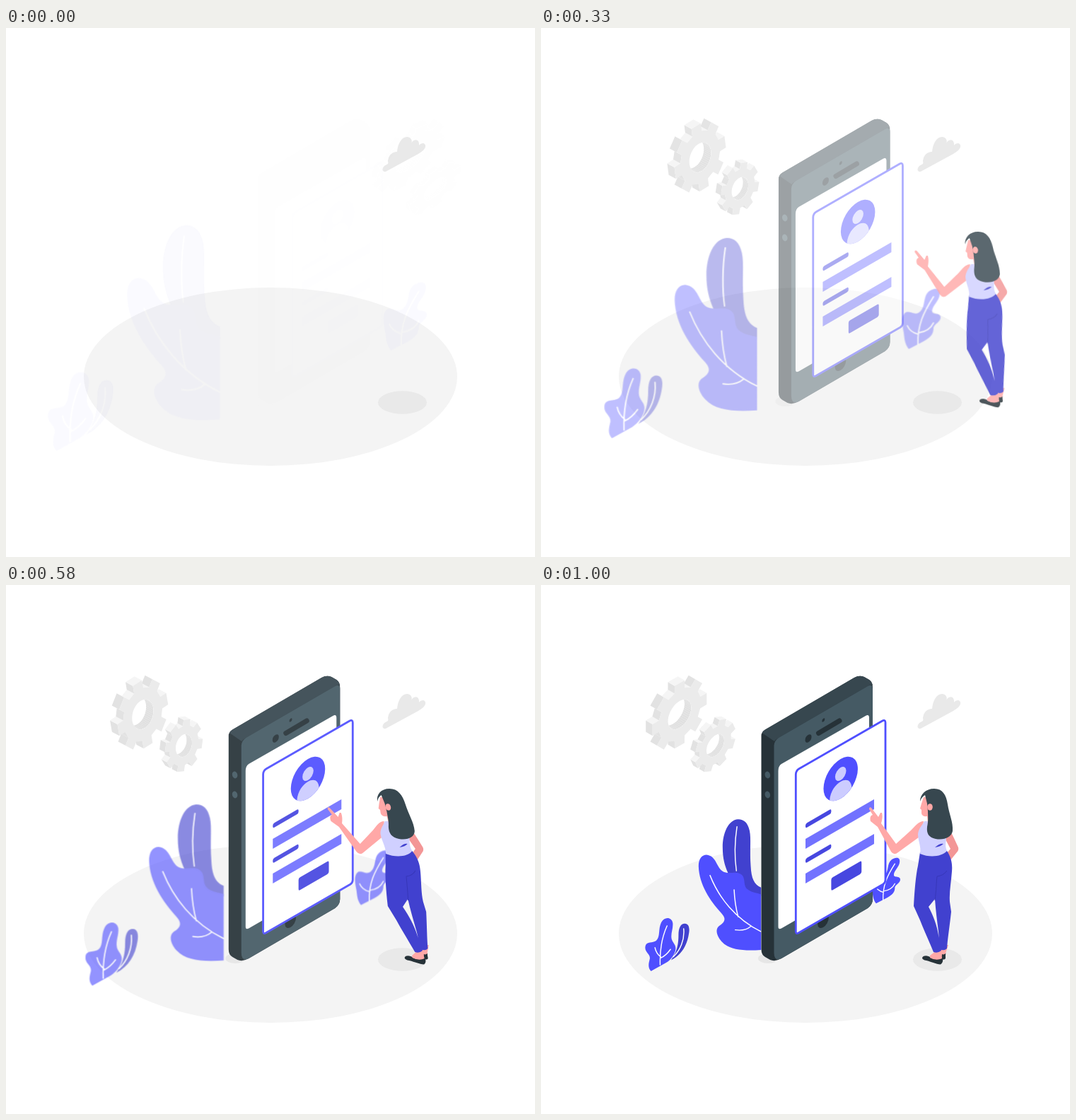
An HTML page for the animation above (1040 ms loop, 748x748 px).

```html
<!DOCTYPE html>
<html lang="en">
<head>
<meta charset="utf-8">
<title>Phone profile form</title>
<style>
html, body { margin: 0; width: 100%; height: 100%; overflow: hidden; background: #fff; }
svg { display: block; width: 100vw; height: 100vh; }
.vein { fill: none; stroke: #fff; stroke-width: 1.8; stroke-linecap: round; }
</style>
</head>
<body>
<svg viewBox="0 0 748 748">
  <ellipse cx="374" cy="493" rx="264" ry="126" fill="#f4f4f4"/>
  <ellipse cx="560.5" cy="529.5" rx="34.5" ry="16.3" fill="#e9e9e9"/>
  <path fill="#e9e9e9" d="M537 203C532 204 531 199 535 195C540 192 541 193 540 188C541 180 546 175 553 175C554 164 559 154 567 154C573 154 575 160 573 163C578 155 585 158 584 166C588 161 594 163 593 168C592 172 588 175 583 178Z"/>

  <g id="plants" fill="#4f4fff">
    <path fill="#4141cf" d="M307 425C295 420 290 409 289 388C287 360 290 340 287 326C284 312 277 306 267 306C250 307 240 330 240 355C240 375 244 387 249 399L270 440H307Z"/>
    <path class="vein" d="M265 319C261 345 261 375 264 396"/>
    <path d="M307 437C297 434 290 434 283 428C275 421 281 408 272 402C264 396 252 402 242 398C229 392 230 370 212 368C203 368 198 376 198 388C199 420 218 448 238 470C248 481 242 487 234 492C226 498 230 511 239 520C252 534 276 536 307 534Z"/>
    <path class="vein" d="M218 404C233 442 262 480 307 502M260 429C261 450 264 465 267 476M262 499C275 501 283 498 289 493"/>
    <path fill="#4141cf" d="M150 552C160 538 163 525 163 508C163 495 167 488 174 488C181 488 183 496 181 506C178 526 168 543 150 552Z"/>
    <path class="vein" d="M172 497C174 516 166 535 154 546"/>
    <path d="M115 571C109 564 111 558 113 549C114 541 104 538 105 529C106 518 117 523 124 518C132 511 127 498 133 486C138 476 151 476 153 487C154 497 149 505 151 515C153 522 159 525 158 533C157 541 150 551 142 556Z"/>
    <path class="vein" d="M143 492C134 512 130 532 131 560M122 530Q124 540 132 546M149 533Q141 544 132 548"/>
    <g transform="matrix(.9355 0 0 .9355 21.2 28.3)">
      <path d="M520 454C514 446 514 439 513 431C511 421 508 407 516 402C523 400 528 407 535 402C545 394 539 380 549 372C556 367 565 367 564 376C563 387 553 392 553 401C554 406 563 402 565 408C566 416 556 418 555 424C555 432 552 437 541 443Z"/>
      <path class="vein" d="M555 380C541 402 532 420 533 448M518 421Q522 430 533 433M555 417Q549 429 534 431"/>
    </g>
  </g>

  <g id="gears"></g>

  <g id="phone">
    <ellipse cx="321" cy="528" rx="14" ry="7" fill="#e6e6e6"/>
    <path fill="#263238" d="M311.5 213Q311.5 208 317 204.5L443 131Q450 127 457 130L464 134Q469 137 469 145V444Q469 452 462 457L340 528Q331 533 324 530L317 526Q311.5 523 311.5 515Z"/>
    <path fill="#37474f" d="M312.5 209Q314 206 317 204.5L443 131Q450 127 457 130L464 134Q468 137 469 142Q467 139.5 462 143L336 216Q331 219 330 221Z"/>
    <path fill="#455a64" d="M329.5 520V227Q330 220 336 216L462 143Q469 139 469 147V444Q469 452 462 457L340 528Q329.5 533 329.5 520Z"/>
    <g fill="#455a64">
      <ellipse cx="320.3" cy="268.5" rx="3.7" ry="5" transform="rotate(-15 320.3 268.5)"/>
      <ellipse cx="320.3" cy="296.5" rx="3.7" ry="5" transform="rotate(-15 320.3 296.5)"/>
    </g>
    <g fill="#263238">
      <path stroke="#263238" stroke-width="7" stroke-linecap="round" d="M392.5 209.5L422 192"/>
      <circle r="5.2" transform="matrix(.866 -.5 0 1 378 217)"/>
      <circle r="2.3" transform="matrix(.866 -.5 0 1 399.3 191)"/>
      <circle r="9" transform="matrix(.866 -.5 0 1 399 475)"/>
    </g>
    <path fill="#fff" d="M335.5 263Q335.5 256 340 253L459 185Q464 182 464 188V414L340 485.5Q335.5 488 335.5 483Z"/>
    <path fill="#fff" stroke="#4f4fff" stroke-width="2.8" d="M360.3 268Q360.3 262.5 365 259.8L482 192.5Q487 189.7 487 194.5V417Q487 421 483.5 423.2L364 492Q360.3 494 360.3 490Z"/>
    <g transform="matrix(.866 -.5 0 1 423.7 274)">
      <circle r="28" fill="#4f4fff"/>
      <circle cy="-7" r="9" fill="#ccccff"/>
      <path fill="#ccccff" d="M-18 21.4C-17 9-8 4 0 4S17 9 18 21.4A28 28 0 0 1-18 21.4Z"/>
    </g>
    <g transform="matrix(.866 -.5 0 1 374 359)">
      <path fill="#7272ff" d="M0 0H112V14H0ZM0 49H112V63H0Z"/>
      <g fill="#4747e0">
        <rect y="-21.5" width="42" height="6.5" rx="2.6"/>
        <rect y="28" width="42" height="6.5" rx="2.6"/>
        <rect x="42" y="76.5" width="49.5" height="18" rx="2.5"/>
      </g>
    </g>
  </g>

  <g id="woman" fill="#ffa8a7">
    <path fill="#f39696" d="M572 346C579 346 581 352 584 358L590 371Q591 375 588 378L579 389L573 380L579 373L571 358Z"/>
    <path d="M559 509H576L573 518L571 526L567 530L559 527Z"/>
    <path fill="#263238" d="M567 522C571 524 573 518 572 523V528Q570 531 566 528ZM539 527C541 523 548 524 551 527C558 531 563 528 568 528Q569 534 565 536.5C558 536 553 533 545 531Q539 530 539 527Z"/>
    <path d="M550 524L559 517L566 519L567 528Q559 532 550 527Z"/>
    <path fill="#4141cf" d="M536 378L574 376C580 385 582 394 581 405C580 420 577 435 578 448L580 462C578 481 575 500 574 514Q570 518 564 515L562 490C560 475 558 459 557 444L548 455C555 468 560 482 562 495L566 517Q561 521 555 519C548 502 541 487 536 474L527 454C528 433 530 410 533 397Z"/>
    <path fill="none" stroke="#3737b8" d="M557 446C559 431 559 420 560 412Q569 411 574 404"/>
    <path d="M541 334C534 334 529 341 523 347L502 366L481 337C483 330 483 326 482 322L480 322L477 328L467 315Q464 313 464 317L469 325C465 326 465 331 466 334L476 342L495 377Q499 383 505 378L538 354Z"/>
    <path fill="#d0d0ff" d="M542 334C550 333 568 340 573 352C574 361 570 367 574 376C567 384 550 386 536 380C538 370 533 362 533 352C534 344 539 340 542 334Z"/>
    <path fill="#4141cf" d="M557 371Q564 365 569 366Q565 370 557 371Z"/>
    <path d="M541 300L538 309L536 316L538 318L538 323Q539 328 546 327L547 336L560 340L558 300Z"/>
    <path fill="#37474f" d="M536 306C536 296 544 288 556 288C568 288 573 297 575 310C577 324 583 335 582 348C580 357 570 361 558 359C548 357 545 351 546 342C548 333 547 327 547 320L546 309L543 297Q538 300 536 306Z"/>
    <ellipse cx="550" cy="314" rx="3.8" ry="4.8"/>
  </g>
</svg>
<script>
const el = id => document.getElementById(id);

// Extruded isometric gear; d is the offset from its front to its back face.
function gear(cx, cy, R, phase, hole, dx, dy) {
  const iso = (r, a) => [cx + .866 * r * Math.cos(a), cy + r * (Math.sin(a) - .5 * Math.cos(a))];
  const path = pts => 'M' + pts.map(p => p.map(v => v.toFixed(1))).join('L') + 'Z';
  const rim = [], bore = [];
  for (let i = 0; i < 8; i++) {
    const a = i * Math.PI / 4 + phase;
    rim.push(iso(R * .77, a - .24), iso(R, a - .18), iso(R, a + .18), iso(R * .77, a + .24));
  }
  for (let i = 0; i < 48; i++) bore.push(iso(hole, -i * Math.PI / 24));
  const walls = (pts, shade) => pts.map((p, i) => {
    const q = pts[(i + 1) % pts.length], ex = q[0] - p[0], ey = q[1] - p[1];
    if (ey * dx - ex * dy <= 0) return '';
    const back = ([x, y]) => [x + dx, y + dy];
    return `<path fill="${shade(ex, ey)}" d="${path([p, q, back(q), back(p)])}"/>`;
  }).join('');
  const inner = `<clipPath id="bore${R}"><path d="${path(bore)}"/></clipPath>
    <g clip-path="url(#bore${R})">${walls(bore, () => '#e0e0e0')}</g>`;
  return inner + walls(rim, (ex, ey) => ex > Math.abs(ey) * .8 ? '#f5f5f5' : '#e2e2e2') +
    `<path fill="#ebebeb" fill-rule="evenodd" d="${path(rim) + path(bore)}"/>`;
}
el('gears').innerHTML = gear(196, 183, 45, 0, 19, -9.5, -5.5) + gear(246.5, 227, 33.5, .39, 14.5, -7, -4);

const bezier = (x1, y1, x2, y2) => x => {
  if (x <= 0 || x >= 1) return x <= 0 ? 0 : 1;
  const at = (u, a, b) => 3 * u * (1 - u) ** 2 * a + 3 * u * u * (1 - u) * b + u ** 3;
  let lo = 0, hi = 1;
  for (let i = 0; i < 24; i++) {
    const mid = (lo + hi) / 2;
    if (at(mid, x1, x2) < x) lo = mid; else hi = mid;
  }
  return at(lo, y1, y2);
};
const overshoot = bezier(.36, -.01, .5, 1.38);
const easeOut = bezier(.15, .1, .5, 1);

function pose(id, transform, opacity) {
  el(id).setAttribute('transform', transform);
  el(id).setAttribute('opacity', Math.max(0, Math.min(1, opacity)));
}

// Slide in from the right while the skew swings -20, 10, -2, 0 degrees.
function lightSpeed(id, time, ease, originY) {
  const enter = ease(time / .6);
  const skew = time < .6 ? -20 + 30 * enter
    : time < .8 ? 10 - 12 * ease((time - .6) / .2)
    : -2 + 2 * ease((time - .8) / .2);
  const k = Math.tan(skew * Math.PI / 180);
  const shift = time < .6 ? 374 * (1 - enter) : 0;
  pose(id, `matrix(1 0 ${k} 1 ${shift - originY * k} 0)`, time < .6 ? enter : 1);
}

function draw(ms) {
  const t = ms % 1040;
  const step = t < 80 ? 0 : Math.floor(t * .024 + .2); // 24 steps per second
  const time = Math.min(1, step / 24 + .03);
  const size = (1.5 - .5 * time) / 1.2335;
  pose('plants', `translate(329 439) scale(${size}) translate(-329 -439)`, time);
  const slide = overshoot(time);
  pose('phone', `translate(${45 * (1 - slide)} 0)`, slide);
  lightSpeed('gears', time, overshoot, 198);
  lightSpeed('woman', time, easeOut, 374);
}

const start = performance.now();
function loop() {
  draw(performance.now() - start);
  requestAnimationFrame(loop);
}
loop();
</script>
</body>
</html>
```
